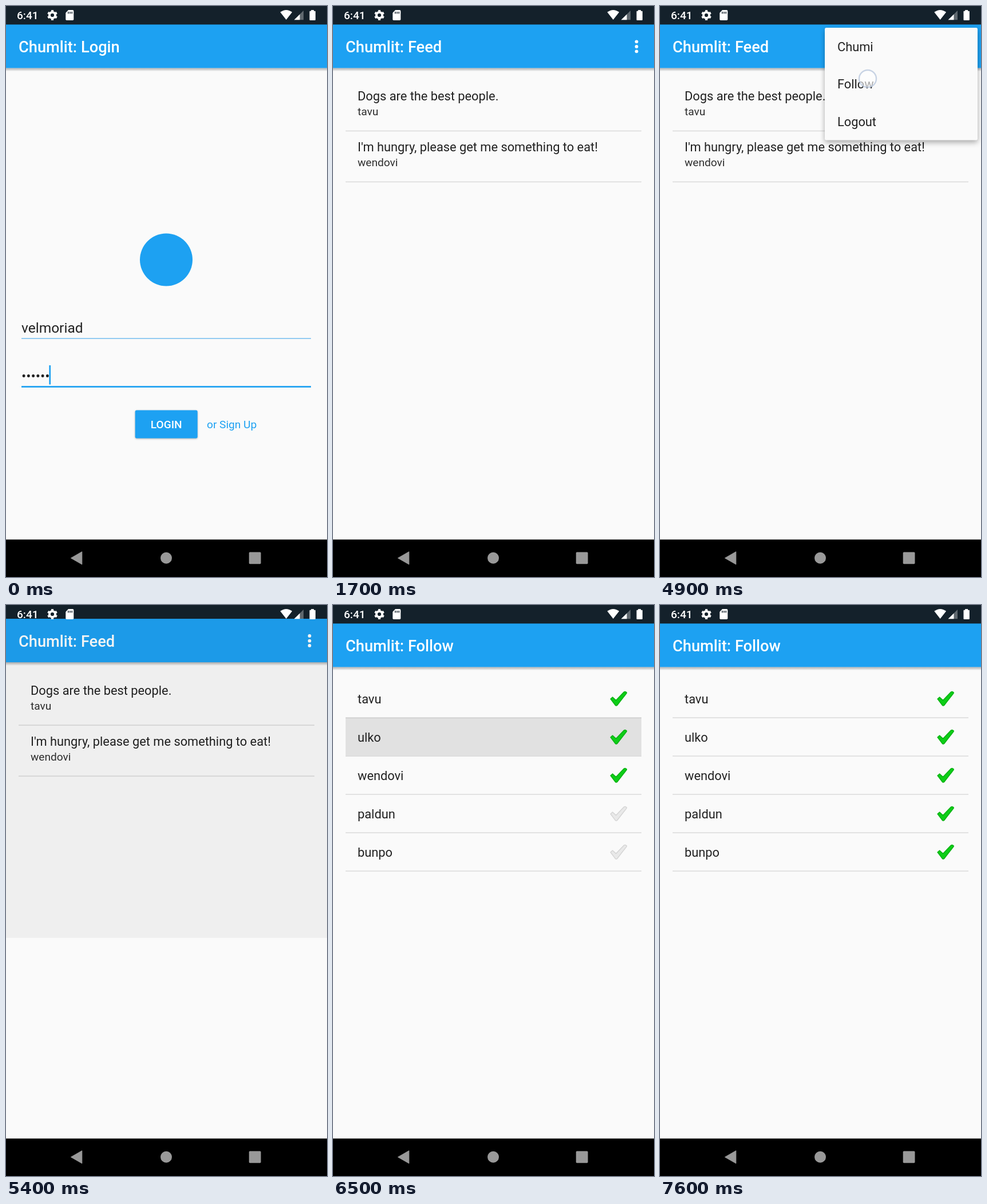
An HTML page that plays this animation: 561 by 998 pixels, repeating every 8000 ms.

```html
<!DOCTYPE html>
<html lang="en">
<head>
<meta charset="utf-8">
<title>Feed app demo</title>
<style>
html, body { margin: 0; width: 100%; height: 100%; overflow: hidden; background: #000; }
svg { display: block; width: 561px; height: 998px; font-family: Roboto, sans-serif; }
.raised { filter: drop-shadow(0 1.5px 1.5px rgba(0, 0, 0, .3)); }
.popup { filter: drop-shadow(0 4px 5px rgba(0, 0, 0, .32)); }
</style>
</head>
<body>
<svg id="stage" viewBox="0 0 561 998" xmlns="http://www.w3.org/2000/svg"></svg>
<script>
const LOOP = 8000, STEP = 100, BLUE = '#1da1f2', INK = '#212121';
const APP = 'Chumlit';
const USERS = ['tavu', 'ulko', 'wendovi', 'paldun', 'bunpo'];
const ROW_TOP = 130, ROW_H = 67;
const BAR_TOP = 32.4, BAR_END = 108.4, NAV_TOP = 932.5;

// Taps: start time, position
const TAPS = [
  [600, 280, 731], [3500, 530.5, 71], [4900, 363, 127],
  [6200, 300, 231], [6700, 300, 365], [7200, 300, 432]
];
// Row index -> time it is pressed
const PRESSED = { 1: 6200, 3: 6700, 4: 7200 };

const text = (x, y, size, str, fill = INK, extra = '') =>
  `<text x="${x}" y="${y}" font-size="${size}" fill="${fill}" ${extra}>${str}</text>`;
const rect = (x, y, w, h, fill, extra = '') =>
  `<rect x="${x}" y="${y}" width="${w}" height="${h}" fill="${fill}" ${extra}/>`;
const circle = (x, y, r, fill, extra = '') =>
  `<circle cx="${x}" cy="${y}" r="${r}" fill="${fill}" ${extra}/>`;
const path = (d, fill, extra = '') => `<path d="${d}" fill="${fill}" ${extra}/>`;
const divider = y => rect(22, y - .8, 517, 1.6, '#dcdcdc');
const MEDIUM = 'font-weight="500"';

function page(id, title, body) {
  return `<g id="${id}"><g clip-path="url(#${id}Wipe)">
    ${rect(0, 0, 561, 1040, '#fafafa')}${body}
    ${rect(0, BAR_END, 561, 6, 'url(#shade)')}
    ${rect(0, 0, 561, BAR_END, BLUE)}${rect(0, 0, 561, BAR_TOP, '#14212b')}
    ${text(22, 81, 27.27, `${APP}: ${title}`, '#fff', MEDIUM)}
    ${id === 'feed' ? [62.3, 71, 79.3].map(y => circle(530.5, y, 2.9, '#fff')).join('') : ''}
    ${rect(0, 0, 561, 1040, '#000', `id="${id}Dim" opacity="0"`)}
  </g></g>`;
}

const login =
  circle(280, 443.5, 46, BLUE) +
  text(27, 571, 24.5, 'velmoriad') +
  rect(27, 580.4, 506, 1.5, '#74bdf0') +
  text(27, 655, 24.5, '••••••') +
  rect(75.4, 628, 2.7, 33.5, BLUE, 'id="caret"') +
  rect(27, 664.1, 506, 2.7, BLUE) +
  rect(225.7, 706.5, 109, 49, BLUE, 'rx="2.7" class="raised"') +
  rect(225.7, 706.5, 109, 49, '#fff', 'rx="2.7" id="btnGlow" opacity="0"') +
  text(280.2, 738, 19.1, 'LOGIN', '#fff', MEDIUM + ' text-anchor="middle"') +
  text(351, 738, 19.1, 'or Sign Up', BLUE);

const post = (y, msg, user) =>
  text(43, y, 21.8, msg) + text(43, y + 26.4, 19.1, user, '#2e2e2e') + divider(y + 53.4);
const feed =
  post(165, 'Dogs are the best people.', USERS[0]) +
  post(254, "I'm hungry, please get me something to eat!", USERS[2]);

const follow = USERS.map((name, i) => {
  const y = ROW_TOP + ROW_H * i;
  return rect(22, y, 517, ROW_H + 1, '#000', `id="press${i}" opacity="0"`) +
    text(43, y + 42.2, 21.8, name) + divider(y + ROW_H) +
    path(`M485 ${y + 34.2}l3.6-3.2 6 5.4 13.4-14q1.500-1.400 3-.9l2 1.200q.6.800-.4 2.200L496.500 ${y + 45.5}q-1.700 1.300-3.200-.3z`,
      '#e9e9e9', `id="tick${i}" stroke-width="1.4" stroke-linejoin="round"`);
}).join('');

const menu = `<g id="menu" clip-path="url(#menuWipe)">
  ${rect(288, 38, 267, 196.5, '#fafafa', 'rx="2.7" class="popup"')}
  ${rect(288, 104, 267, 65.5, '#000', 'id="menuPress" opacity="0"')}
  ${['Chumi', 'Follow', 'Logout'].map((s, i) => text(310, 79 + 65.4 * i, 21.8, s)).join('')}
</g>`;

const statusIcons =
  text(19, 23, 19.1, '6:41', '#fff', MEDIUM) +
  circle(81, 16, 5.1, 'none', 'stroke="#fff" stroke-width="4"') +
  circle(81, 16, 7.5, 'none',
    'stroke="#fff" stroke-width="3" pathLength="12" stroke-dasharray="1" stroke-dashoffset="-.5"') +
  path('M109 7h7.5q1.8 0 1.8 1.8v14.4q0 1.8-1.8 1.8h-10.4q-1.8 0-1.8-1.8V12z', '#fff') +
  path('M108.8 10v3.6M112 10v3.6M115.2 10v3.6', 'none', 'stroke="#14212b" stroke-width="1.5"') +
  path('M479.3 10.8q10.4-7.8 20.8 0L489.7 24z', '#fff') +
  path('M520 8v16.3h-16.4z', '#fff', 'opacity=".32"') +
  path('M513.5 14.5v9.8h-9.9z', '#fff') +
  rect(533.2, 7, 4.8, 3, '#fff') + rect(530.5, 8.8, 10.4, 16.2, '#fff', 'rx="1"');

const navBar =
  rect(0, NAV_TOP, 561, 66, '#000') +
  path('M113.5 964.9L132.8 953.8V976z', '#999', 'stroke="#999" stroke-linejoin="round"') +
  circle(280, 964.7, 10, '#999') +
  rect(424.7, 954.4, 20.8, 20.8, '#999', 'rx="1.6"');

const wipe = id => `<clipPath id="${id}">${rect(0, 0, 561, 1040, '#000')}</clipPath>`;

document.getElementById('stage').innerHTML =
  `<defs><linearGradient id="shade" x2="0" y2="1">
    <stop offset="0" stop-opacity=".3"/><stop offset="1" stop-opacity="0"/></linearGradient>
    ${['loginWipe', 'feedWipe', 'followWipe', 'menuWipe'].map(wipe).join('')}</defs>` +
  page('login', 'Login', login) + page('feed', 'Feed', feed) + page('follow', 'Follow', follow) +
  circle(530.5, 71, 19, '#fff', 'id="halo"') + menu + statusIcons + navBar +
  circle(0, 0, 15, '#fff', 'id="tap" fill-opacity=".62" stroke="#bccadf" stroke-width="2.4" stroke-opacity=".8"');

const $ = id => document.getElementById(id);
const set = (el, attrs) => {
  for (const k in attrs) el.setAttribute(k, attrs[k]);
};
const span = (t, start, length) => Math.max(0, Math.min(1, (t - start) / length));
const ease = p => p * p * (3 - 2 * p);
const easeOut = p => 1 - (1 - p) ** 3;
const between = (t, a, b) => t >= a && t < b;

// The next page slides up while it is unveiled from the bottom; the old one lifts and dims
function openPage(from, to, p) {
  set($(to), { transform: `translate(0 ${41 * (1 - p)})`, display: p > 0 ? 'inline' : 'none' });
  set($(to + 'Dim'), { opacity: 0 });
  set($(to + 'Wipe').firstChild, { y: 957 * (1 - p) });
  if (p > 0 || from === 'login') {
    set($(from), { transform: `translate(0 ${-20 * p})`, display: p < 1 ? 'inline' : 'none' });
    set($(from + 'Dim'), { opacity: .1 * p });
  }
}

function drawMenu(t) {
  const q = easeOut(span(t, 3550, 450));
  set($('menu'), { opacity: Math.min(1, q * 2) * (1 - span(t, 5100, 200)) });
  set($('menuWipe').firstChild, { x: 567 - 287 * q, y: 20, width: 287 * q, height: 232 * q });
  set($('menuPress'), { opacity: .1 * span(t, 4900, 200) });
  set($('halo'), {
    r: 19 + 5 * span(t, 3500, 300),
    opacity: between(t, 3500, 3900) ? .14 * (1 - span(t, 3600, 300)) : 0
  });
}

function drawRows(t) {
  USERS.forEach((_, i) => {
    const start = PRESSED[i];
    const on = start === undefined || t >= start + 300;
    const held = between(t, start, start + 400);
    set($('press' + i), { opacity: held ? .1 * span(t, start - 100, 300) : 0 });
    set($('tick' + i), { fill: on ? '#0dce17' : '#e9e9e9', stroke: on ? '#0bb014' : '#d4d4d4' });
  });
}

function drawTap(t) {
  const hit = TAPS.find(([start]) => between(t, start, start + 300));
  set($('tap'), hit
    ? { cx: hit[1], cy: hit[2], opacity: 1 - span(t, hit[0] + 100, 200) }
    : { opacity: 0 });
}

function render(t) {
  set($('caret'), { opacity: (t + 900) % 1000 < 500 ? 0 : 1 });
  set($('btnGlow'), { opacity: .2 * span(t, 600, 200) * (1 - span(t, 800, 300)) });
  openPage('login', 'feed', ease(span(t, 1200, 450)));
  openPage('feed', 'follow', ease(span(t, 5200, 450)));
  drawMenu(t);
  drawRows(t);
  drawTap(t);
}

const began = performance.now();
function tick() {
  const t = (performance.now() - began) % LOOP;
  render(Math.floor(t / STEP) * STEP);
  requestAnimationFrame(tick);
}
tick();
</script>
</body>
</html>
```
